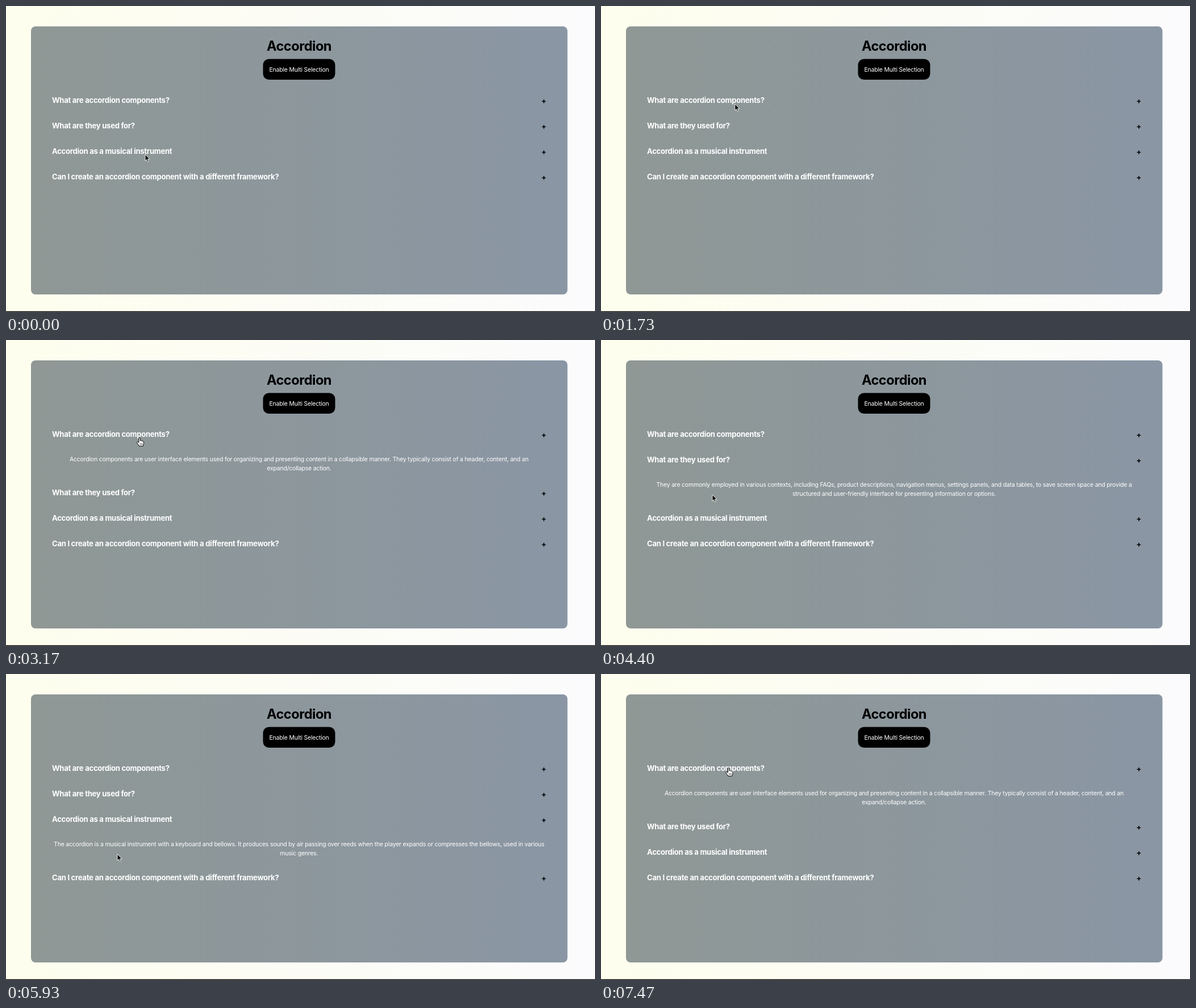
These frames come from a looping animation (1037x540 px, 8000 ms). An HTML page:

```html
<!DOCTYPE html>
<html lang="en">
<head>
<meta charset="utf-8">
<title>Accordion</title>
<style>
  html, body { margin: 0; width: 100%; height: 100%; overflow: hidden; }
  body { background: linear-gradient(90deg, #fefeee, #fbfbfd); }
  svg { display: block; width: 1037px; height: 540px; }
  text { font-family: Inter, "Open Sans", sans-serif; font-size: 10.5px; letter-spacing: -.02em; fill: #fff; }
  .mid { text-anchor: middle; }
  .title { font-size: 23.6px; font-weight: 700; letter-spacing: -.022em; fill: #000; }
  .head { font-size: 13.1px; font-weight: 700; letter-spacing: -.022em; }
  .plus { fill: #000; letter-spacing: 0; }
</style>
</head>
<body>
<svg viewBox="0 0 1037 540">
  <defs>
    <linearGradient id="panel">
      <stop offset="0" stop-color="#8f9895"/>
      <stop offset="1" stop-color="#8a96a4"/>
    </linearGradient>
  </defs>
  <rect x="44" y="36" width="944.5" height="473" rx="8" fill="url(#panel)"/>
  <text class="mid title" x="516" y="79">Accordion</text>
  <rect x="452.5" y="93.5" width="127" height="36.5" rx="10.5"/>
  <text class="mid" x="516" y="116">Enable Multi Selection</text>
  <g id="rows"></g>
  <rect y="538.7" width="1037" height="1.3"/>
  <g id="cursor">
    <path id="arrow" d="M0 0V11.2L2.6 8.8L4.3 12.8L6.2 12L4.5 8.1H8Z"
      fill="#000" stroke="#fff" stroke-width=".9" stroke-linejoin="round"/>
    <g id="hand" stroke="#000" stroke-width="1" stroke-linejoin="round" fill="#fff">
      <path d="M-1.6 7.6V.3C-1.6 -1.4 .9 -1.4 .9 .3V4.2C1.2 3.4 3 3.5 3.1 4.8C3.5 4 5 4.2 5.2 5.4C5.6 5 7 5.2 7 6.6V9C7 11 5.6 12 5.6 13.6H-1.2C-1.4 12.3 -3.2 10.4 -4.8 8C-5.6 6.4 -4 5.6 -2.9 6.7Z"/>
      <path d="M.5 8.8V11.4M2.4 8.8V11.4M4.3 8.8V11.4" stroke-width=".7"/>
    </g>
  </g>
</svg>
<script>
const LOOP = 8000, TOP = 166, STEP = 45, BODY = 58;

const items = [
  ["What are accordion components?",
   "Accordion components are user interface elements used for organizing and presenting content in a collapsible manner. They typically consist of a header, content, and an",
   "expand/collapse action."],
  ["What are they used for?",
   "They are commonly employed in various contexts, including FAQs, product descriptions, navigation menus, settings panels, and data tables, to save screen space and provide a",
   "structured and user-friendly interface for presenting information or options."],
  ["Accordion as a musical instrument",
   "The accordion is a musical instrument with a keyboard and bellows. It produces sound by air passing over reeds when the player expands or compresses the bellows, used in various",
   "music genres."],
  ["Can I create an accordion component with a different framework?"]
];

// [time, opened item]
const clicks = [[0, -1], [2200, 0], [4400, 1], [5930, 2], [7270, 0]];

// [start, end, x, y]: the pointer eases to x, y between the two times
const moves = [
  [0, 0, 245, 262],
  [30, 570, 239, 167],
  [1230, 1830, 235.5, 173.5],
  [3170, 3970, 196, 273],
  [5200, 5530, 196, 318],
  [6330, 6930, 225, 166.5]
];
const FOCUS = 1870;

const $ = id => document.getElementById(id);

function make(tag, parent, attrs, text) {
  const el = document.createElementNS("http://www.w3.org/2000/svg", tag);
  for (const k in attrs) el.setAttribute(k, attrs[k]);
  if (text) el.textContent = text;
  return parent.appendChild(el);
}

const rows = items.map(([head, ...lines]) => {
  const row = make("g", $("rows"), {});
  make("text", row, { class: "head", x: 81, y: 5 }, head);
  make("text", row, { class: "head plus mid", x: 947, y: 5.8 }, "+");
  const body = make("g", row, {});
  lines.forEach((line, i) =>
    make("text", body, { class: "mid", x: 516, y: 47.8 + i * 15.8 }, line));
  return { row, body };
});

const ease = p => p * p * (3 - 2 * p);

function pointer(t) {
  let [, , x, y] = moves[0];
  for (const [start, end, toX, toY] of moves.slice(1)) {
    const p = ease(Math.min(1, Math.max(0, (t - start) / (end - start))));
    x += (toX - x) * p;
    y += (toY - y) * p;
  }
  return [x, y];
}

function draw(t) {
  const open = clicks.filter(c => c[0] <= t).pop()[1];
  const [x, y] = pointer(t);
  let hover = false;
  rows.forEach(({ row, body }, i) => {
    const rowY = TOP + i * STEP + (open >= 0 && i > open ? BODY : 0);
    row.setAttribute("transform", `translate(0 ${rowY})`);
    body.style.display = i === open ? "" : "none";
    if (t >= FOCUS && Math.abs(y - rowY) < 15) hover = true;
  });
  $("cursor").setAttribute("transform", `translate(${x} ${y})`);
  $("hand").style.display = hover ? "" : "none";
  $("arrow").style.display = hover ? "none" : "";
}

const began = performance.now();
function tick() {
  draw((performance.now() - began) % LOOP);
  requestAnimationFrame(tick);
}
tick();
</script>
</body>
</html>
```
